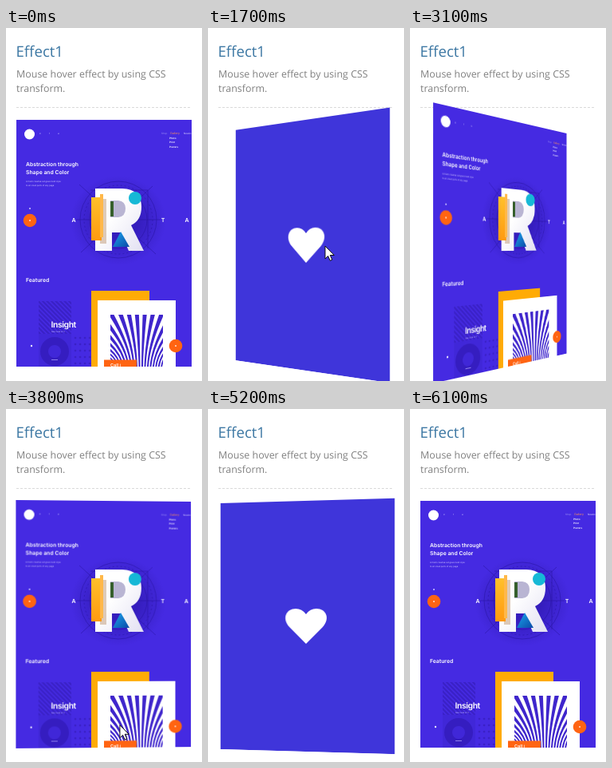
An HTML page for the animation above (6400 ms loop, 246 px wide and 442 px high).

```html
<!DOCTYPE html>
<html lang="en">
<head>
<meta charset="utf-8">
<title>Flip card</title>
<style>
  html, body { margin: 0; width: 100%; height: 100%; overflow: hidden; background: #fff; }
  .stage { position: fixed; inset: 0; overflow: hidden; contain: strict; }
  svg { position: absolute; left: 0; top: 0; display: block; }
  text { text-rendering: geometricPrecision; }
  .intro, .pointer { width: 100%; height: 100%; }
  .intro { font-family: "Open Sans", "Noto Sans", sans-serif; }
  .scene { position: absolute; left: 13px; top: 115px; width: 220px; height: 314px; perspective: 600px; }
  .card { width: 100%; height: 100%; transform-style: preserve-3d; }
  .face { backface-visibility: hidden; font-family: Inter, Lato, sans-serif; }
  .back { transform: rotateY(180deg); }
</style>
</head>
<body>
<div class="stage">
<svg class="intro">
  <text x="12.5" y="36" font-size="18.6" fill="#3c77a3">Effect1</text>
  <g font-size="12.45" fill="#808080">
    <text x="13" y="62">Mouse hover effect by using CSS</text>
    <text x="13" y="80">transform.</text>
  </g>
  <path d="M13 99.5H233" stroke="#dadada" stroke-dasharray="3 2"/>
</svg>

<div class="scene"><div class="card" id="card">
  <svg class="face" width="220" height="314" viewBox="13 115 220 314">
    <defs>
      <linearGradient id="bar" x2="0" y2="1"><stop stop-color="#ffc02a"/><stop offset="1" stop-color="#ff9a10"/></linearGradient>
      <linearGradient id="letter" x2="1" y2="1"><stop offset=".4" stop-color="#fff"/><stop offset="1" stop-color="#e2e0f2"/></linearGradient>
      <linearGradient id="wedge" x2="1" y2="1"><stop stop-color="#1ca8ee"/><stop offset="1" stop-color="#0a49a8"/></linearGradient>
      <radialGradient id="shade"><stop offset=".4" stop-color="#2a15a4" stop-opacity=".6"/><stop offset="1" stop-color="#2a15a4" stop-opacity="0"/></radialGradient>
      <clipPath id="stripeBox"><path d="M41 342H82V383H41Z"/></clipPath>
      <clipPath id="art"><path d="M131 359H197V424H131Z"/></clipPath>
    </defs>
    <path d="M13 115H233V424H13Z" fill="#452ae2"/>

    <circle cx="29.5" cy="133" r="6.5" fill="#fff"/>
    <g font-size="3" fill="#c4baff">
      <text x="42" y="133">e</text><text x="54" y="133">t</text><text x="65" y="133">a</text>
      <text x="195" y="133" fill="#9d8ff5">Shop</text>
      <text x="206" y="133" fill="#ff9155" font-size="3.6">Gallery</text>
      <text x="223" y="133" fill="#d5ceff">Newest</text>
      <g fill="#fff" font-weight="600"><text x="205" y="138.5">Photo</text><text x="205" y="144">Print</text><text x="205" y="149.5">Posters</text></g>
    </g>

    <g fill="#fff" font-weight="600" font-size="6.8">
      <text x="25" y="173">Abstraction through</text>
      <text x="25" y="182.7">Shape and Color</text>
      <text x="25" y="317.7">Featured</text>
    </g>
    <g fill="#d8d0ff" font-size="2.6">
      <text x="25" y="193">A fresh creative set gives bold style</text>
      <text x="25" y="197.5">to all small parts of any page</text>
    </g>

    <ellipse cx="141" cy="241" rx="60" ry="56" fill="url(#shade)"/>
    <g fill="none" stroke="#26139a" stroke-width=".7" opacity=".7">
      <circle cx="141" cy="240" r="48"/><circle cx="141" cy="240" r="36"/><circle cx="141" cy="240" r="43" stroke-dasharray="2 3"/>
      <path d="M92 196 188 283M94 281 184 198M88 240H194M106 203H178V276"/>
    </g>
    <path fill="url(#letter)" d="M112 201H146Q170 202 170 224 170 241 157 247L173 279H154L144 256H133V279H112Z"/>
    <path d="M131 216H141Q150 217 150 226 150 236 141 237H131Z" fill="#b9b5d3"/>
    <path d="M131 217H135V236H131Z" fill="#355f2c"/>
    <path d="M144 255 155 274H134Z" fill="url(#wedge)"/>
    <path d="M118 214H126V270H118Z" fill="#c9a98c" opacity=".6"/>
    <path d="M107 212H120V266H107Z" fill="url(#bar)"/>
    <path d="M118 208H122V262H118Z" fill="#ffb84a"/>
    <circle cx="162" cy="213" r="8" fill="#16b8d6"/>
    <g fill="#fff" font-size="7" font-weight="600" text-anchor="middle">
      <text x="85" y="243">A</text><text x="197" y="243">T</text><text x="227" y="243">A</text>
    </g>
    <circle cx="30" cy="226" r="1" fill="#d0c8ff"/>
    <circle cx="30" cy="241" r="8.3" fill="#ff6412"/>
    <circle cx="30" cy="241" r="1" fill="#ffe2d0"/>

    <path id="stripes" clip-path="url(#stripeBox)" stroke="#3a21c6" stroke-width="2.2"/>
    <path d="M41 383H82V424H41Z" fill="#4027d8"/>
    <circle cx="61" cy="405" r="13" fill="none" stroke="#351dc0" stroke-width="10"/>
    <path id="dots" stroke="#3a21c6" stroke-width="2.6" stroke-linecap="round"/>
    <text x="56.5" y="374.5" font-size="10.4" font-weight="600" letter-spacing="-.4" fill="#fff">Insight</text>
    <text x="57" y="381" font-size="2.5" fill="#c9c0ff">See more of it</text>
    <path d="M57 415.5H65" stroke="#b5aaff" stroke-width=".7"/>
    <circle cx="32" cy="398" r="1.2" fill="#e5e0ff"/>

    <path d="M107 329H180V424H107Z" fill="#ffab05"/>
    <path d="M115 341H213V424H115Z" fill="#fff"/>
    <path id="fan" clip-path="url(#art)" fill="#3f26cc"/>
    <path d="M123 415.5H164V424H123Z" fill="#ff6412"/>
    <text x="131" y="424" font-size="5.5" font-weight="600" fill="#fff">Call i</text>
    <circle cx="213" cy="398" r="8.3" fill="#ff6412"/>
    <circle cx="213" cy="398" r="1" fill="#ffe2d0"/>
  </svg>

  <svg class="face back" width="220" height="314" viewBox="13 115 220 314">
    <path d="M13 115H233V429H13Z" fill="#3f35da"/>
    <path d="M123 294 102 273C92 262 98 250 110 250Q118 250 123 257 128 250 136 250C148 250 154 262 144 273Z" fill="#fff"/>
  </svg>
</div></div>

<svg class="pointer">
  <path id="cursor" d="M0 0V16L3.7 12.5 6.2 18.3 8.8 17.2 6.3 11.5H11.3Z" fill="#fff" stroke="#111" stroke-linejoin="round"/>
</svg>
</div>

<script>
  const LOOP = 6400, FLIP = 550;
  // Hover starts and ends alternate
  const flips = [1296, 2726, 3765, 5136];
  // Each visit of the pointer: [time, x, y]
  const visits = [
    [[1270, 185, 442], [1400, 142, 262], [1500, 147, 273], [2600, 147, 273], [2735, 150, 442]],
    [[3755, 150, 442], [3950, 120, 246], [4900, 120, 246], [5145, 128, 442]]
  ];
  const $ = id => document.getElementById(id);
  const clamp = v => Math.max(0, Math.min(1, v));
  const ease = v => (1 - Math.cos(Math.PI * clamp(v))) / 2;
  const repeat = (n, make) => Array.from({ length: n }, (_, i) => make(i)).join('');

  $('stripes').setAttribute('d', repeat(16, i => `M${i * 5.5} 340l45 45`));
  $('dots').setAttribute('d', repeat(20, i => `M${87 + i % 4 * 6} ${388 + Math.floor(i / 4) * 8}h.1`));

  // Stripes rise from the bottom edge and spread outwards
  const rim = a => `${164 + 75 * Math.cos(a)} ${412 - 75 * Math.sin(a)}`;
  $('fan').setAttribute('d', repeat(19, i => {
    const x = 136 + i * 3.4, a = Math.PI * (1.02 - i / 18);
    return `M${x} 430Q${x} 398 ${rim(a)}L${rim(a - .09)}Q${x + 1.9} 398 ${x + 1.9} 430Z`;
  }));

  function pointerAt(t) {
    for (const path of visits)
      for (let i = 1; i < path.length; i++) {
        const [t0, x0, y0] = path[i - 1], [t1, x1, y1] = path[i];
        if (t < t0 || t >= t1) continue;
        const k = (t - t0) / (t1 - t0);
        return [x0 + (x1 - x0) * k, y0 + (y1 - y0) * k];
      }
    return null;
  }

  function draw() {
    const t = performance.now() % LOOP;
    const turn = flips.reduce((sum, start, i) => sum + (i % 2 ? -1 : 1) * ease((t - start) / FLIP), 0);
    $('card').style.transform = `rotateY(${180 * turn}deg)`;
    const p = pointerAt(t);
    $('cursor').style.display = p ? '' : 'none';
    if (p) $('cursor').setAttribute('transform', `translate(${p})`);
    requestAnimationFrame(draw);
  }
  draw();
</script>
</body>
</html>
```
